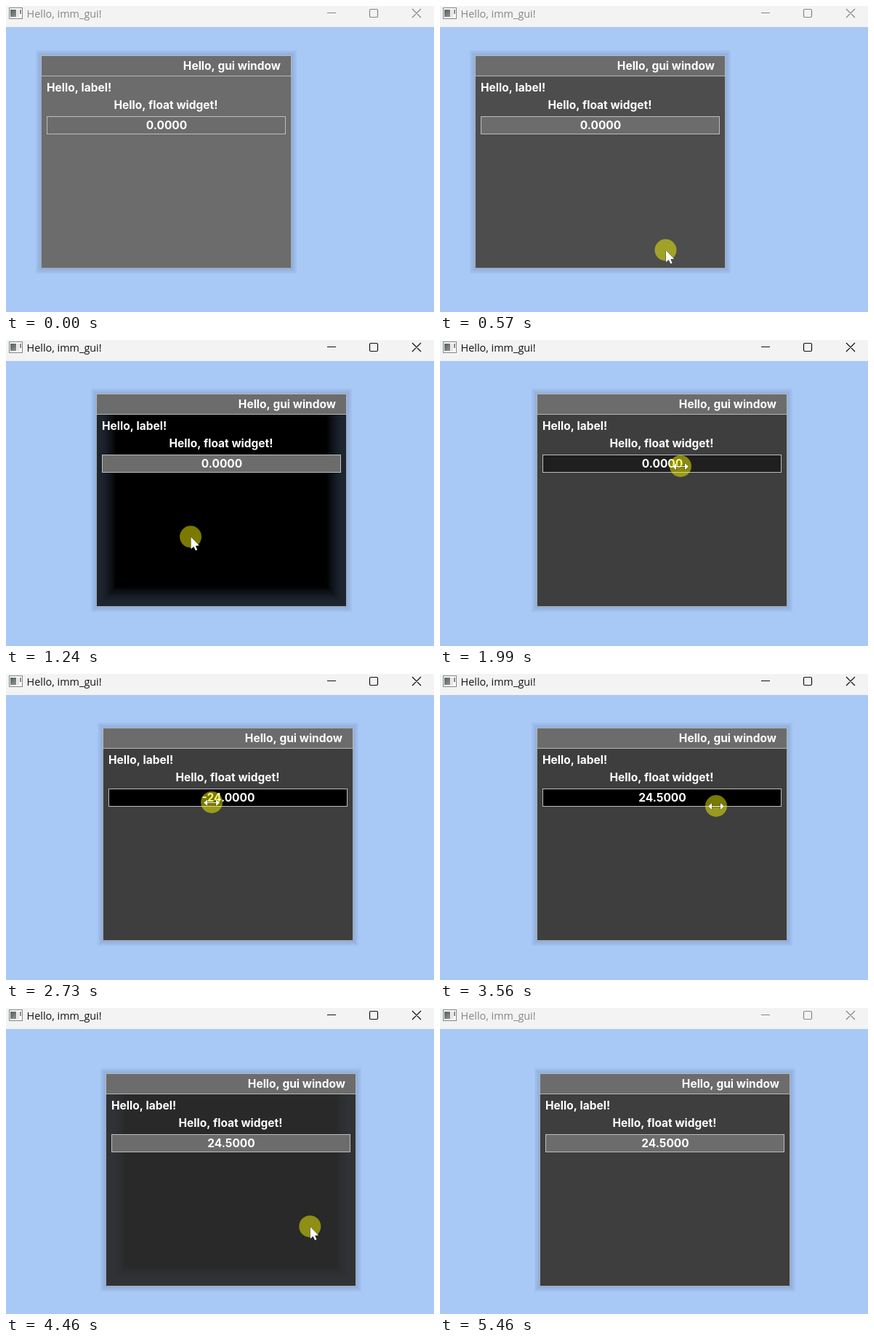
These frames come from a looping animation (589 px wide and 422 px high, 5.54 s). An HTML page with a canvas:

```html
<!DOCTYPE html>
<html lang="en">
<head>
<meta charset="utf-8">
<title>Hello, imm_gui!</title>
<style>
html, body { margin: 0; width: 100%; height: 100%; overflow: hidden; background: #a8c8f6; }
canvas { display: block; }
</style>
</head>
<body>
<canvas id="stage" width="589" height="422"></canvas>
<script>
const ctx = document.getElementById('stage').getContext('2d');
const LOOP = 5540, TICK = 83;
const ENTRY = { x: 442, y: 407 };

// Pointer moves, in ticks; between them the pointer rests.
const moves = [
  { from: 0, to: 6, x: 179, y: 266 },
  { from: 7.3, to: 12.25, x: 263, y: 272 },
  { from: 12.5, to: 18, x: 331, y: 174 },
  { from: 26, to: 30.8, x: 265, y: 178 },
  { from: 30.8, to: 33, x: 343, y: 178 },
  { from: 35, to: 39, x: 380, y: 182 },
  { from: 41, to: 44, x: 382, y: 251 },
  { from: 44, to: 47.5, x: 386, y: 267 },
  { from: 48.5, to: 53, x: 540, y: 430 }
];

const clamp = (v, lo, hi) => Math.max(lo, Math.min(hi, v));
const ramp = (n, from, to) => clamp((n - from) / (to - from), 0, 1);
const pulse = (n, on, off, fade) => ramp(n, on, on + fade) - ramp(n, off, off + fade);
const ease = u => u * u * u * (u * (6 * u - 15) + 10);

function pointer(n) {
  let { x, y } = ENTRY;
  for (const m of moves) {
    const e = ease(ramp(n, m.from, m.to));
    x += (m.x - x) * e;
    y += (m.y - y) * e;
  }
  return { x, y };
}

function dragged(n, press, release) {
  const a = pointer(press), b = pointer(clamp(n, press, release));
  return { x: b.x - a.x, y: b.y - a.y };
}

function shade(hover, press) {
  const g = Math.round((108 - 46 * hover) * (1 - press));
  return `rgb(${g},${g},${g})`;
}

function rect(x, y, w, h, color) {
  ctx.fillStyle = color;
  ctx.fillRect(x, y, w, h);
}

function frame(x, y, w, h, color) {
  ctx.strokeStyle = color;
  ctx.strokeRect(x + .5, y + .5, w, h);
}

function text(s, x, y, align) {
  ctx.textAlign = align;
  ctx.fillText(s, x, y);
}

function poly(points) {
  ctx.beginPath();
  points.forEach(([x, y]) => ctx.lineTo(x, y));
  ctx.closePath();
}

function titleBar(active) {
  rect(0, 0, 589, 29, '#f3f3f3');
  rect(4, 2, 19, 16, '#fafafa');
  frame(4, 2, 18, 15, '#858585');
  const g = ctx.createLinearGradient(6, 5, 14, 15);
  g.addColorStop(0, '#55645f');
  g.addColorStop(1, '#909090');
  rect(6, 5, 8, 10, g);
  rect(15, 5, 3, 10, '#e4e4e4');
  rect(19, 5, 2, 6, '#8a8a8a');

  ctx.fillStyle = ctx.strokeStyle = active ? '#111' : '#868686';
  ctx.font = '14.4px "Open Sans", "Noto Sans", sans-serif';
  text('Hello, imm_gui!', 28.6, 16, 'left');
  ctx.fillRect(442, 9, 12, 1);
  ctx.lineWidth = 1.2;
  ctx.beginPath();
  ctx.roundRect(500.5, 4.5, 11, 11, 1.5);
  ctx.moveTo(559, 4);
  ctx.lineTo(571, 16);
  ctx.moveTo(571, 4);
  ctx.lineTo(559, 16);
  ctx.stroke();
  ctx.lineWidth = 1;
}

function guiWindow(n, x, y, value) {
  const w = 344, h = 293, glow = 27;
  for (let i = 1; i < 8; i++)
    frame(x - i, y - i, w + 2 * i, h + 2 * i, `rgba(40,60,100,${.2 * (1 - i / 9)})`);

  const press = pulse(n, 7, 13, 3) + pulse(n, 43, 48, 3);
  rect(x, y, w, h, shade(ramp(n, 1, 4), press));
  for (let i = 1; i < glow; i++) {
    const alpha = .2 * press * (1 - (i / glow) ** 2);
    frame(x + i, y + i, w - 2 * i, h - 2 * i, `rgba(150,190,246,${alpha})`);
  }
  frame(x, y, w, h, '#a9a9a9');
  rect(x, y, w + 1, 28, '#6c6c6c');
  frame(x, y, w, 28, '#b8b8b8');

  rect(x + 8, y + 84, 328, 24, shade(pulse(n, 16, 41, 2), pulse(n, 19, 41, 2)));
  frame(x + 8, y + 84, 328, 24, '#bdbdbd');

  ctx.fillStyle = '#fff';
  ctx.font = '700 15.5px Inter, sans-serif';
  text('Hello, gui window', x + 330, y + 20, 'right');
  text('Hello, label!', x + 8, y + 50, 'left');
  text('Hello, float widget!', x + 172, y + 74, 'center');
  text(value.toFixed(4), x + 173, y + 102, 'center');
}

function cursor({ x, y }, resize) {
  ctx.save();
  ctx.translate(x, y);
  ctx.fillStyle = 'rgba(255,255,0,.48)';
  ctx.beginPath();
  ctx.arc(0, 0, 15, 0, 2 * Math.PI);
  ctx.fill();
  if (resize) {
    poly([[-11, .5], [-6, -4], [-6, 0], [6, 0], [6, -4], [11, .5], [6, 5], [6, 1], [-6, 1], [-6, 5]]);
  } else {
    poly([[.5, .5], [.5, 17], [4.2, 13.6], [6.8, 19], [9.2, 18], [6.8, 12.5], [11.8, 12.2]]);
  }
  ctx.strokeStyle = 'rgba(0,0,0,.5)';
  ctx.stroke();
  ctx.fillStyle = '#fff';
  ctx.fill();
  ctx.restore();
}

function draw(now) {
  const n = Math.floor((now % LOOP - 320) / TICK + .12);
  const first = dragged(n, 7, 13), second = dragged(n, 44, 48);
  const x = Math.ceil(48 + first.x + second.x);
  const y = Math.ceil(68 + first.y + second.y);
  // Half a unit per pixel dragged in the field.
  const value = Math.round(dragged(n, 20, 39).x) / 2;

  rect(0, 0, 589, 422, '#a8c8f6');
  titleBar(n >= 7 && n < 62);
  guiWindow(n, x, y, value);
  if (n >= 0 && n < 53) cursor(pointer(n), n >= 18 && n < 42);
}

const start = performance.now();
function loop() {
  draw(performance.now() - start);
  requestAnimationFrame(loop);
}
loop();
</script>
</body>
</html>
```
